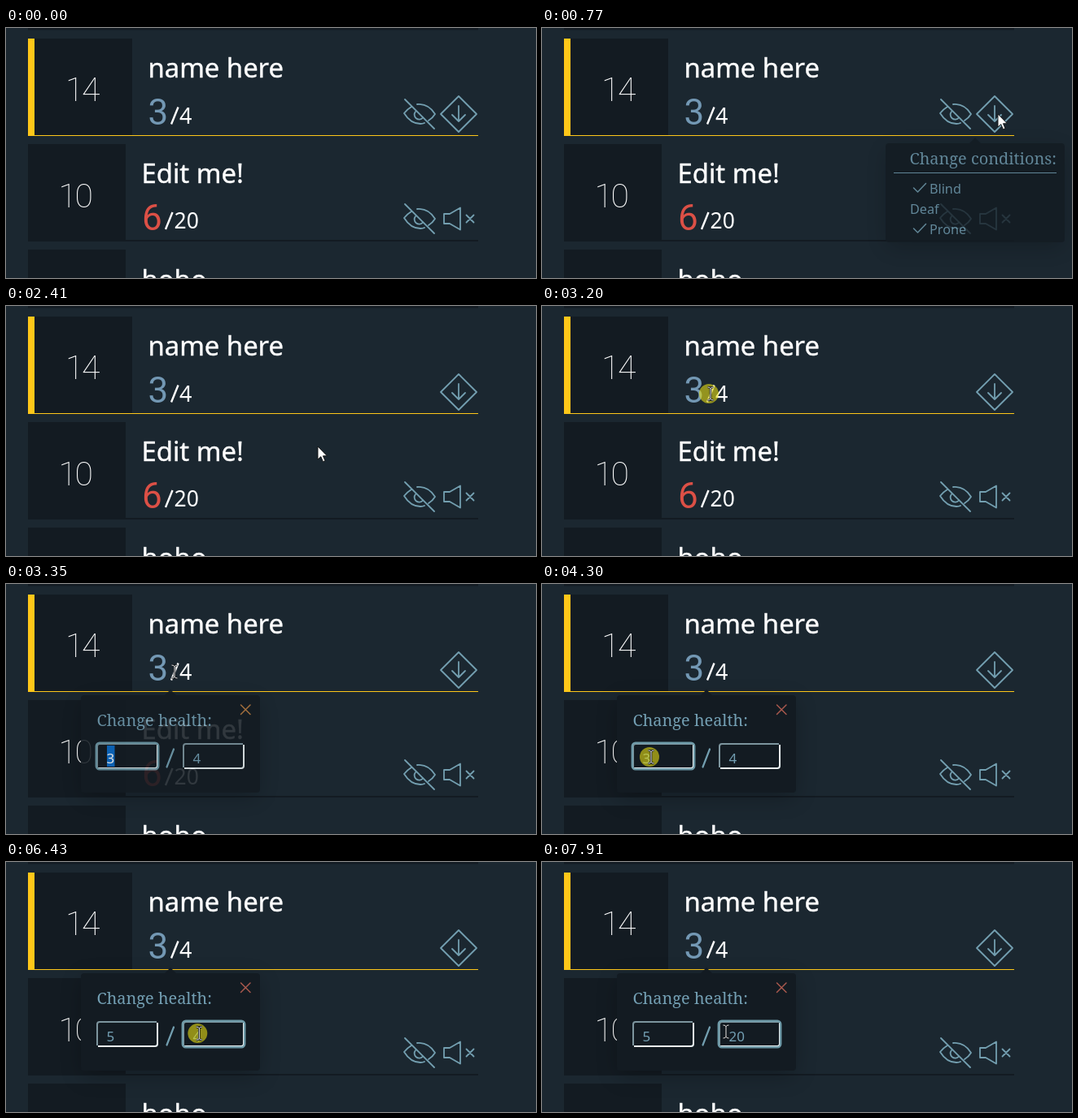
Animation, 651 px wide and 308 px high, one loop 8000 ms. Source, as an HTML page:

```html
<!DOCTYPE html>
<html lang="en">
<head>
<meta charset="utf-8">
<title>Encounter tracker</title>
<style>
  html, body { margin: 0; width: 100%; height: 100%; overflow: hidden; background: #1b2730; }
  svg { display: block; width: 651px; height: 308px; }
  text { font-family: "Noto Sans", "Open Sans", sans-serif; white-space: pre; }
  .name { font-size: 32.8px; fill: #fff; stroke: #fff; stroke-width: .4; }
  .turn { font: 100 41px Roboto, sans-serif; letter-spacing: -2.5px; fill: #fff; }
  .hp { font: 400 44px Roboto, sans-serif; }
  .max { font-size: 27px; font-weight: 500; fill: #fff; }
  .slash { stroke: #fff; stroke-width: 2.4; }
  .head { font: 19.9px "Noto Serif", serif; fill: #739fb3; }
  .item { font-size: 16.2px; fill: #739fb3; }
  .num { font-size: 17px; fill: #739fb3; }
  .line { fill: none; stroke: #739fb0; stroke-width: 1.8; stroke-linecap: round; stroke-linejoin: round; }
  .thin { stroke-width: 1.5; }
  .dark { fill: #131b22; }
</style>
</head>
<body>
<svg viewBox="0 0 651 308" xmlns="http://www.w3.org/2000/svg">
  <defs>
    <filter id="soft" x="-40%" y="-60%" width="180%" height="220%"><feGaussianBlur stdDeviation="14"/></filter>
    <g id="eye" class="line">
      <path d="M-18-18L18 18M-10-9Q-15-6-19-1Q-11 12 1 12Q4 12 6 11M-3-12Q11-13 19 0Q16 5 11 8"/>
      <path d="M-5-3A5.800 5.800 0 0 0 4 4.500"/>
    </g>
    <g id="box">
      <rect class="dark" x="1" y="1" width="74" height="30" rx="3"/>
      <path d="M1 30V4Q1 1 4 1H74" fill="none" stroke="#7d959e" stroke-width="2"/>
      <path d="M75 2V28Q75 31 72 31H2" fill="none" stroke="#e9f0f2" stroke-width="2"/>
    </g>
    <rect id="ring" x="-.2" y="-.2" width="76.400" height="32.400" rx="4" fill="none" stroke="#6f9ba9" stroke-width="2.400"/>
    <path id="tick" class="line thin" d="M0 0L5 5L15-5.500"/>
  </defs>

  <rect width="651" height="308" fill="#1b2730"/>
  <rect x="27" y="0" width="553" height="2.500" class="dark"/>

  <rect x="35" y="13" width="120" height="119" class="dark"/>
  <rect x="27" y="13" width="8" height="120" fill="#ffc719"/>
  <rect x="27" y="132" width="553" height="1" fill="#ffc719"/>
  <text class="turn" x="73" y="90">14</text>
  <text class="name" x="174.500" y="61">name here</text>
  <text class="hp" x="174.500" y="119" fill="#7398b4">3</text>
  <path class="slash" d="M203 118.500L211.500 97.500"/>
  <text class="max" x="213" y="118">4</text>
  <use id="blindIcon" href="#eye" x="508" y="106"/>
  <g class="line" transform="translate(556 106)">
    <path d="M0-22L22 0L0 22L-22 0ZM0-10V9M-8 1L0 9L8 1"/>
  </g>

  <rect x="27" y="143" width="120" height="119" class="dark"/>
  <rect x="27" y="261" width="553" height="2" class="dark"/>
  <text class="turn" x="64.500" y="220.500">10</text>
  <text class="name" x="166.500" y="191">Edit me!</text>
  <text class="hp" x="167" y="248.500" fill="#dc5046">6</text>
  <path class="slash" d="M196 248L204.500 227"/>
  <text class="max" x="206.500" y="246.500" style="font-size:26.500px">20</text>
  <use href="#eye" x="508" y="235"/>
  <path class="line" d="M538 229H545L558 221.500V248.500L545 241H538ZM565.500 230.500L574.500 239.500M574.500 230.500L565.500 239.500"/>

  <rect x="27" y="273" width="120" height="40" class="dark"/>
  <text class="name" x="166.500" y="321.500">hoho</text>

  <g id="conditions">
    <rect x="424" y="150" width="216" height="120" filter="url(#soft)" opacity=".25"/>
    <path class="dark" d="M524 143L532 135L540 143Z"/>
    <rect class="dark" x="422" y="142" width="220" height="122" rx="4"/>
    <text class="head" x="451.500" y="168">Change conditions:</text>
    <rect x="432" y="178" width="200" height="1" fill="#739fb3"/>
    <use id="check" href="#tick" x="456.500" y="197"/>
    <text id="blind" class="item" y="203.500">Blind</text>
    <text id="deaf" class="item" x="452" y="229">Deaf</text>
    <use href="#tick" x="456.500" y="247"/>
    <text class="item" x="476" y="254">Prone</text>
  </g>

  <g id="health">
    <rect x="94" y="145" width="216" height="118" filter="url(#soft)" opacity=".25"/>
    <path class="dark" d="M194 138L202 130L210 138Z"/>
    <rect class="dark" x="92" y="137" width="220" height="120" rx="4"/>
    <text class="head" x="111.500" y="175">Change health:</text>
    <path id="close" class="line thin" d="M288.500 149L300 160.500M300 149L288.500 160.500"/>
    <use href="#box" x="111" y="196"/>
    <use href="#box" x="217" y="196"/>
    <use id="focus" href="#ring" y="196"/>
    <path class="line" style="stroke-width:2.200" d="M197.500 225.500L206 203.500"/>
    <rect id="mark" y="199" width="9.500" height="26" fill="#0a6cc8"/>
    <text id="now" class="num" x="123.500" y="221">3</text>
    <text id="full" class="num" x="229.500" y="221">4</text>
    <rect id="caret" y="199" width="1" height="26" fill="#b9cdd5"/>
  </g>

  <circle id="click" r="12" fill="#e6dc14" opacity=".6"/>
  <g id="cursor">
    <path id="arrow" d="M0 0V16L3.800 12.600L6.400 18.800L9 17.700L6.400 11.700H11.300Z" fill="#fff" stroke="#111" stroke-width=".9"/>
    <g id="beam" fill="none">
      <use href="#beamLine" stroke="#0b0f13" stroke-width="2.600"/>
      <use href="#beamLine" stroke="#f2f2f2" stroke-width="1"/>
    </g>
  </g>
  <defs>
    <path id="beamLine" d="M-1.500-8Q1.500-8 2-6.500Q2.500-8 5.500-8M2-7V7M-1.500 8Q1.500 8 2 6.500Q2.500 8 5.500 8"/>
  </defs>
</svg>
<script>
const LOOP = 8000, TICK = 78.45, FIRST = 220;
const $ = id => document.getElementById(id);
const show = (id, on) => $(id).setAttribute('visibility', on ? 'inherit' : 'hidden');
const set = (id, name, value) => $(id).setAttribute(name, value);
const within = (t, a, b) => t >= a && t < b;
const ramp = (t, a, b) => Math.min(1, Math.max(0, (t - a) / (b - a)));
const easeOut = p => 1 - (1 - p) * (1 - p);

// pointer path: time, x, y
const path = [
  [220, 632, 262], [400, 606, 205], [600, 560, 106], [1000, 560, 106],
  [1080, 548, 140], [1160, 512, 208], [1230, 496, 197.5], [1790, 496, 197.5],
  [2020, 383, 173], [2420, 383, 173], [2560, 352, 163], [2960, 205, 108],
  [3590, 205, 108], [3750, 191, 132], [3840, 191, 132], [4050, 160, 178],
  [4220, 132, 213], [4310, 132, 213], [4455, 128, 213], [5720, 128, 213],
  [6180, 240, 212], [6350, 240, 212], [6580, 224, 209]
];
const clicks = [[1460, 1540], [2090, 2390], [3180, 3300], [4200, 4670], [6250, 6570]];

function pointer(t) {
  const i = path.findIndex(k => k[0] > t);
  if (i < 0) return path[path.length - 1].slice(1);
  if (i === 0) return path[0].slice(1);
  const [t0, x0, y0] = path[i - 1], [t1, x1, y1] = path[i];
  const p = (t - t0) / (t1 - t0);
  return [x0 + (x1 - x0) * p, y0 + (y1 - y0) * p];
}

function overText(t, x, y) {
  if (within(t, 2900, 3600)) return true;
  return t > 3700 && y > 196 && (x < 187 || x > 217);
}

function draw(ms) {
  // the screen updates in fixed ticks
  const t = Math.max(0, FIRST + TICK * Math.floor((ms - FIRST) / TICK + 0.2));
  const [x, y] = pointer(t);
  const beam = overText(t, x, y);
  const clicking = clicks.some(c => within(t, c[0], c[1]));

  show('cursor', t >= 200);
  set('cursor', 'transform', `translate(${x} ${y})`);
  show('arrow', !beam);
  show('beam', beam);
  show('click', clicking);
  set('click', 'cx', x);
  set('click', 'cy', y);

  const open = easeOut(ramp(t, 610, 900)) * (1 - ramp(t, 2030, 2165));
  set('conditions', 'opacity', open);
  show('conditions', open > 0);
  const checked = t < 1540, hover = t >= 1225;
  show('check', checked);
  $('blind').style.fill = hover ? '#fff' : '';
  set('blind', 'x', checked ? 476 : 452);
  $('deaf').style.fill = within(t, 1130, 1225) ? '#fff' : '';
  show('blindIcon', t < 2090);

  const fade = easeOut(ramp(t, 3230, 3430));
  set('health', 'opacity', fade);
  show('health', fade > 0);
  $('close').style.stroke = t < 3420 ? '#b5793f' : '#a8584e';

  const second = t >= 6240;
  set('focus', 'x', second ? 217 : 111);
  const marked1 = t < 4200 || within(t, 4450, 5370);
  const marked2 = within(t, 6480, 7500);
  show('mark', marked1 || marked2);
  set('mark', 'x', marked2 ? 230 : 124);
  $('now').textContent = t < 5370 ? '3' : '5';
  $('now').style.fill = marked1 ? '#fff' : '';
  $('full').textContent = t < 7500 ? '4' : t < 7580 ? '2' : '20';
  $('full').style.fill = marked2 ? '#fff' : '';
  show('caret', within(t, 5450, 5770) || within(t, 7580, 7890));
  set('caret', 'x', second ? 250 : 134);
}

const start = performance.now();
function tick() {
  draw((performance.now() - start) % LOOP);
  requestAnimationFrame(tick);
}
draw(0);
tick();
</script>
</body>
</html>
```
